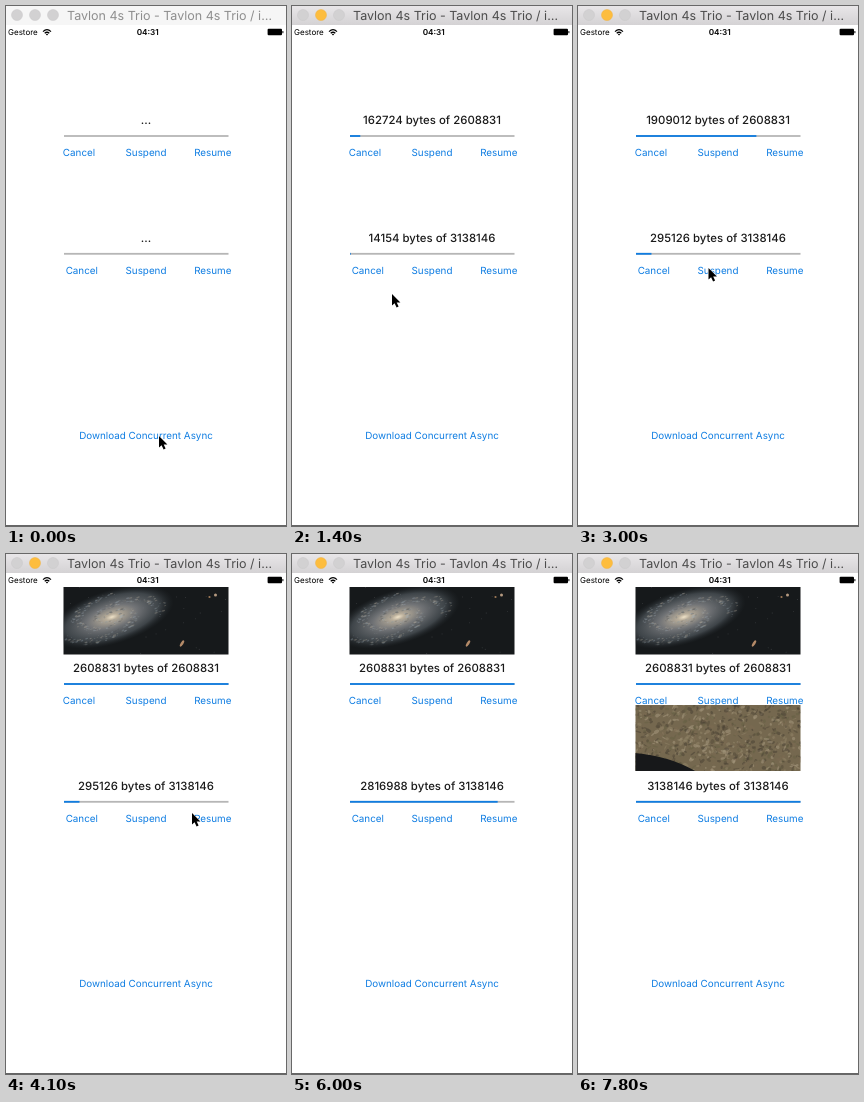
An HTML page that plays this animation: 280 px wide and 520 px high, repeating every 7.9 s.

```html
<!DOCTYPE html>
<html>
<head>
<meta charset="utf-8">
<style>
html, body { margin: 0; width: 100%; height: 100%; overflow: hidden; background: #fff; }
svg { display: block; width: 280px; height: 520px; }
text { font-family: Inter, "Open Sans", sans-serif; text-rendering: geometricPrecision; }
.mid { text-anchor: middle; }
.btn { font-size: 9.85px; fill: #0f7de2; }
.label { font-size: 11.4px; font-weight: 450; fill: #1a1a1a; }
.light { fill: #d2d1d2; stroke: #c8c7c8; stroke-width: .5; }
#title { font-size: 12.5px; fill: #8e8e8e; }
#bar { fill: #f6f6f6; }
.active #bar { fill: url(#chrome); }
.active #title { fill: #4c4c4c; }
.active #min { fill: #fdbd3e; stroke: #f0b040; }
</style>
</head>
<body>
<svg id="stage" viewBox="0 0 280 520">
  <defs>
    <linearGradient id="chrome" x2="0" y2="1">
      <stop stop-color="#e8e6e8"/><stop offset="1" stop-color="#d4d2d4"/>
    </linearGradient>
    <radialGradient id="disk">
      <stop stop-color="#efe2c8"/><stop offset=".1" stop-color="#b8ad9a"/>
      <stop offset=".4" stop-color="#7b7d80" stop-opacity=".9"/>
      <stop offset=".75" stop-color="#5a6268" stop-opacity=".6"/>
      <stop offset="1" stop-color="#2c3338" stop-opacity="0"/>
    </radialGradient>
    <clipPath id="clip1"><rect x="57.5" y="33" width="165" height="67.5"/></clipPath>
    <clipPath id="clip2"><rect x="57.5" y="151" width="165" height="66"/></clipPath>
  </defs>

  <rect id="bar" width="280" height="19"/>
  <circle class="light" cx="11" cy="9" r="5.5"/>
  <circle class="light" id="min" cx="29" cy="9" r="5.5"/>
  <circle class="light" cx="47" cy="9" r="5.5"/>
  <text id="title" x="61" y="13.7">Tavlon 4s Trio - Tavlon 4s Trio / i…</text>

  <text x="2" y="29" font-size="8">Gestore</text>
  <g fill="none" stroke="#000" stroke-width="1.2">
    <path d="M37 25.6Q41 21.8 45 25.6M38.7 27.3Q41 25.2 43.3 27.3"/>
    <path d="M41 29.6l-1.2-1.3q1.2-1 2.4 0z" fill="#000" stroke="none"/>
  </g>
  <text class="mid" x="141.7" y="29" font-size="8.2" font-weight="600">04:31</text>
  <rect x="261.6" y="22.7" width="14.4" height="6.6" rx="1"/>
  <rect x="276.4" y="25" width="1" height="2.2" rx=".5"/>

  <g id="rows"></g>
  <text class="mid btn" x="140" y="433">Download Concurrent Async</text>
  <g id="galaxy" clip-path="url(#clip1)"></g>
  <g id="earth" clip-path="url(#clip2)"></g>
  <rect y="519" width="280" height="1" fill="#666"/>
  <path id="cursor" d="M0 0V11.6L2.6 9.2L4.6 13.4L6.6 12.5L4.7 8.4H8.4Z" stroke="#fff" stroke-width="1" paint-order="stroke"/>
</svg>
<script>
const $ = id => document.getElementById(id);
const LEFT = 58, WIDTH = 164.5, LOOP = 7900, STEP = 100;

function add(parent, tag, attrs, text = "") {
  const el = document.createElementNS("http://www.w3.org/2000/svg", tag);
  for (const k in attrs) el.setAttribute(k, attrs[k]);
  el.textContent = text;
  return parent.appendChild(el);
}

// Piecewise linear track: keys are [time, ...values]
function at(keys, t) {
  if (t <= keys[0][0]) return keys[0].slice(1);
  const i = keys.findIndex(k => k[0] > t);
  if (i < 0) return keys[keys.length - 1].slice(1);
  const a = keys[i - 1], b = keys[i], p = (t - a[0]) / (b[0] - a[0]);
  return a.slice(1).map((v, j) => v + (b[j + 1] - v) * p);
}

function download(y, cancelX, total, keys) {
  const g = $("rows"), track = { x: LEFT, y: y + 11.1, height: 1.8 };
  const label = add(g, "text", { class: "mid label", x: 140, y });
  add(g, "rect", { ...track, width: WIDTH, fill: "#b6b6b6" });
  const fill = add(g, "rect", { ...track, fill: "#0f7de2" });
  [["Cancel", cancelX], ["Suspend", 140], ["Resume", 206.8]].forEach(([name, x]) =>
    add(g, "text", { class: "mid btn", x, y: y + 32.3 }, name));
  return t => {
    const n = Math.round(at(keys, t)[0]), started = t >= keys[0][0];
    label.textContent = started ? `${n} bytes of ${total}` : "...";
    fill.setAttribute("width", started ? WIDTH * n / total : 0);
  };
}

const rows = [
  download(118, 73, 2608831, [[1200, 8192], [1400, 162724], [2300, 921476],
    [3000, 1909012], [3500, 2608831]]),
  download(235.8, 75.8, 3138146, [[1300, 2048], [1400, 14154], [2300, 161910],
    [2700, 295126], [4200, 295126], [6000, 2816988], [6300, 3138146]])
];

const path = [[1100, 153, 430], [1400, 100, 288], [1600, 83, 278], [1900, 118, 266],
  [2100, 130.5, 262], [3100, 130.5, 262], [3500, 186, 259], [4900, 186, 259],
  [5200, 147, 340], [5500, 150, 436], [5700, 182, 500], [5800, 237, 500]];

let seed = 7;
const rnd = () => (seed = seed * 16807 % 2147483647) / 2147483647;
const pick = list => list[Math.floor(rnd() * list.length)];

function drawGalaxy() {
  const g = $("galaxy");
  add(g, "rect", { x: 57, y: 33, width: 166, height: 68, fill: "#16191b" });
  const disk = add(g, "g", { transform: "translate(106 63) rotate(-17) scale(1 .42)" });
  add(disk, "circle", { r: 64, fill: "url(#disk)" });
  for (let i = 0; i < 420; i++) {
    const r = 8 + 48 * rnd(), a = Math.log(r) * 2.6 + Math.floor(rnd() * 3) * 2.09 + rnd() * .9;
    add(disk, "circle", { cx: r * Math.cos(a), cy: r * Math.sin(a), r: .5 + rnd() * 1.3,
      fill: pick(["#a4b0ba", "#8b949a", "#4a4d50", "#b5ac9c"]), opacity: .3 });
  }
  for (let i = 0; i < 35; i++)
    add(g, "circle", { cx: 58 + rnd() * 164, cy: 33 + rnd() * 67, r: .4, fill: "#7d8084", opacity: .6 });
  add(g, "ellipse", { rx: 3.6, ry: 1.3, fill: "#b48a68", transform: "translate(176 89.5) rotate(-58)" });
  add(g, "circle", { cx: 203.5, cy: 43, r: 1.1, fill: "#a07a58" });
  add(g, "circle", { cx: 209.5, cy: 41, r: 1.5, fill: "#b59a80" });
}

function drawEarth() {
  const g = $("earth");
  add(g, "rect", { x: 57, y: 151, width: 166, height: 67, fill: "#75684f" });
  for (let i = 0; i < 900; i++) {
    const x = 57 + rnd() * 166, y = 151 + rnd() * 67;
    add(g, "ellipse", { rx: .6 + rnd() * 2.6, ry: .5 + rnd() * 1.4, opacity: .5,
      transform: `translate(${x} ${y}) rotate(${rnd() * 120 - 80})`,
      fill: pick(["#94866b", "#524838", "#676044", "#aa9c82", "#463f32", "#7d6b52"]) });
  }
  add(g, "path", { d: "M57 199Q92 202 119 218H57Z", fill: "#17181a" });
}

drawGalaxy();
drawEarth();

function show(id, on) { $(id).style.display = on ? "" : "none"; }

function frame() {
  const t = Math.floor(performance.now() / STEP) * STEP % LOOP;
  $("stage").classList.toggle("active", t >= 700);
  rows.forEach(update => update(t));
  show("galaxy", t >= 3600);
  show("earth", t >= 6500);
  show("cursor", t < 5900);
  $("cursor").setAttribute("transform", `translate(${at(path, t)})`);
  requestAnimationFrame(frame);
}
frame();
</script>
</body>
</html>
```
